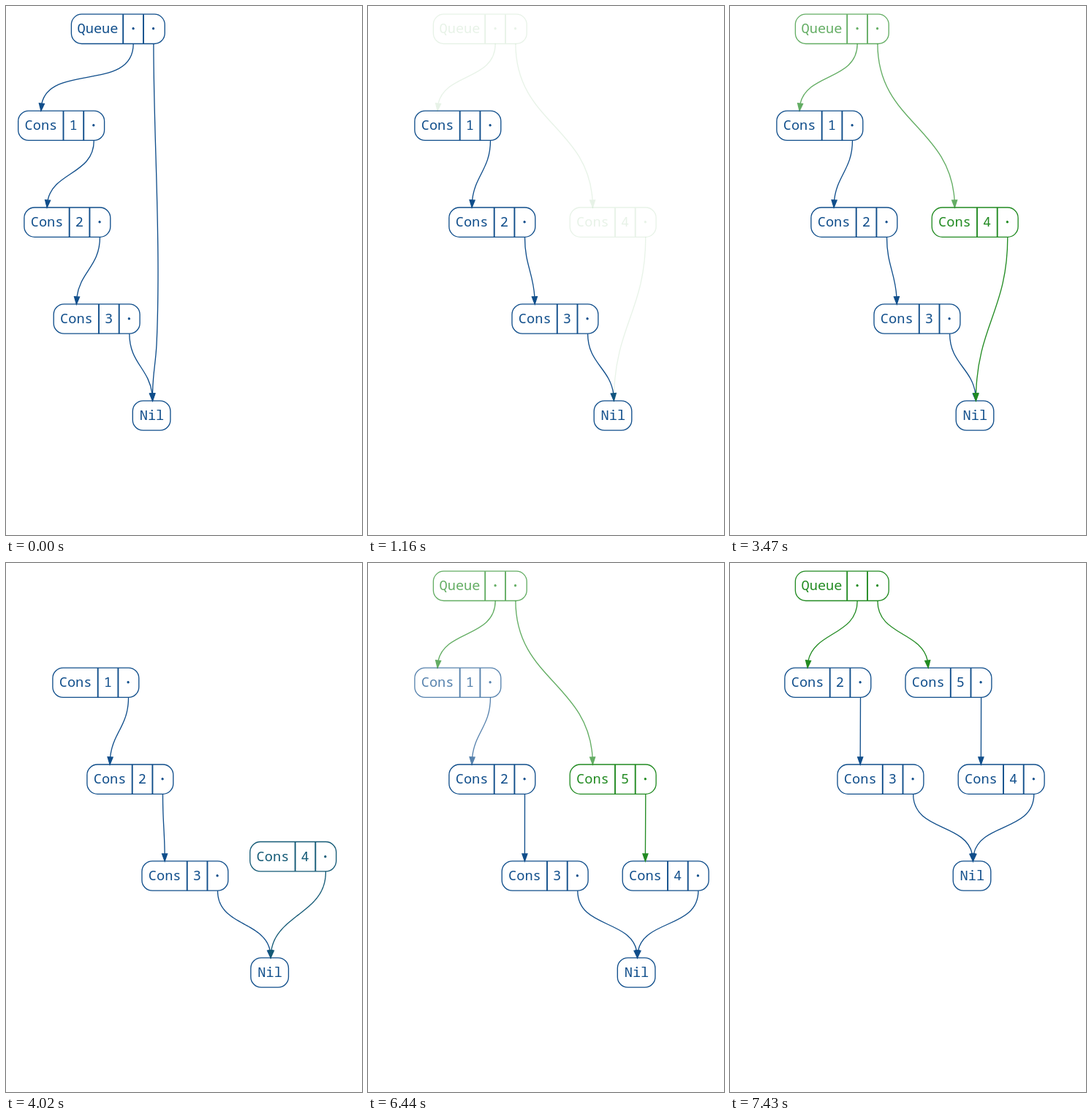
Recreate the animation shown at these times as an HTML page. Size 487 by 722 pixels, loop 8 s.

```html
<!DOCTYPE html>
<html lang="en">
<head>
<meta charset="utf-8">
<title>Persistent queue</title>
<style>
  html, body { margin: 0; width: 100%; height: 100%; overflow: hidden; background: #fff; }
  svg { display: block; }
  text { font: 18.67px "Noto Sans Mono", monospace; text-anchor: middle; stroke: none; }
  .dot { stroke: inherit; stroke-width: 0.9; }
  .bar { stroke-width: 1.9; }
</style>
</head>
<body>
<svg id="stage" width="487" height="722" viewBox="0 0 487 722" fill="none" stroke-width="1.33"></svg>
<script>
const LOOP = 8000, STEP = 110, STEPS = 10, SAMPLES = 48;
const STARTS = [500, 3470, 6440];
const ROW_TOP = 11.2, ROW_GAP = 131.9, HEIGHT = 40.3, RADIUS = 14.2, HEAD = 10;
const BLUE = [16, 78, 139], GREEN = [34, 139, 34];

// Geometry per node kind, relative to the node's left edge.
const KINDS = {
  Queue: { width: 127.8, bars: [70.8, 98.6], labels: [36.1, 84.6, 112.2], ports: [84.8, 112.5], entry: 0 },
  Cons: { width: 117.9, bars: [61.8, 89.5], labels: [31.2, 75.4, 103.1], ports: [103.6], entry: 31.2 },
  Nil: { width: 51.6, bars: [], labels: [26.2], ports: [], entry: 27.2 }
};

// nodes: name -> [left, row]; edges: [from, to, port, optional curve up to the arrowhead]
const STATES = [
  {
    nodes: { Queue: [89.4, 0], 1: [16.7, 1], 2: [24.9, 2], 3: [65.2, 3], Nil: [173.3, 4] },
    green: [],
    edges: [['Queue', 1, 0], [1, 2, 0], [2, 3, 0], [3, 'Nil', 0],
      ['Queue', 'Nil', 1, 'C202,160 208,250 208,361 C208,400 207.5,430 206,462 C204.5,490 201,500']]
  },
  {
    nodes: { Queue: [89.4, 0], 1: [63.9, 1], 2: [110.9, 2], 4: [276.2, 2], 3: [197, 3], Nil: [309.2, 4] },
    green: ['Queue', '4'],
    edges: [['Queue', 1, 0], ['Queue', 4, 1], [1, 2, 0], [2, 3, 0], [3, 'Nil', 0], [4, 'Nil', 0]]
  },
  {
    nodes: { Queue: [89.4, 0], 1: [63.9, 1], 2: [110.9, 2], 5: [276.2, 2], 3: [183.2, 3], 4: [348.2, 3], Nil: [341.3, 4] },
    green: ['Queue', '5'],
    edges: [['Queue', 1, 0], ['Queue', 5, 1], [1, 2, 0], [2, 3, 0], [5, 4, 0], [3, 'Nil', 0], [4, 'Nil', 0]]
  },
  {
    nodes: { Queue: [89.4, 0], 2: [74.9, 1], 5: [240, 1], 3: [147, 2], 4: [312.2, 2], Nil: [305.2, 3] },
    green: ['Queue'],
    edges: [['Queue', 2, 0], ['Queue', 5, 1], [2, 3, 0], [5, 4, 0], [3, 'Nil', 0], [4, 'Nil', 0]]
  }
];

const stage = document.getElementById('stage');
const clamp = v => Math.min(1, Math.max(0, v));
const mix = (a, b, k) => a + (b - a) * k;
const mixAll = (a, b, k) => a.map((v, i) => mix(v, b[i], k));
const kindOf = name => KINDS[name] || KINDS.Cons;
const rowTop = row => ROW_TOP + row * ROW_GAP;

// The part of a cubic from its start up to t, by repeated halving of its polygon.
function cutCubic(points, t) {
  const kept = [points[0]];
  while (points.length > 1) {
    points = points.slice(1).map((p, i) => mixAll(points[i], p, t));
    kept.push(points[0]);
  }
  return kept;
}

// A cubic with vertical ends, trimmed to leave room for the arrowhead.
function link([x1, y1], [x2, y2]) {
  const reach = Math.hypot(x2 - x1, y2 - y1) * 4 / 9;
  const cubic = [[x1, y1], [x1, y1 + reach], [x2, y2 - reach], [x2, y2]];
  let low = 0, high = 1;
  for (let i = 0; i < 24; i++) {
    const t = (low + high) / 2, end = cutCubic(cubic, t)[3];
    if (Math.hypot(x2 - end[0], y2 - end[1]) > HEAD) low = t; else high = t;
  }
  const [start, c1, c2, base] = cutCubic(cubic, low);
  return { d: `M${start}C${c1} ${c2} ${base}`, base };
}

function samplePath(d) {
  const path = document.createElementNS('http://www.w3.org/2000/svg', 'path');
  path.setAttribute('d', d);
  const length = path.getTotalLength();
  return Array.from({ length: SAMPLES + 1 }, (_, i) => {
    const p = path.getPointAtLength(length * i / SAMPLES);
    return [p.x, p.y];
  });
}

function buildState({ nodes, green, edges }, index) {
  const items = new Map();
  const color = name => green.includes(String(name)) ? GREEN : BLUE;
  // Each state owns a fresh queue cell, so it never carries over.
  const key = name => name === 'Queue' ? name + index : name;
  for (const [name, [x, row]] of Object.entries(nodes)) {
    items.set(key(name), { name, pos: [x, rowTop(row)], color: color(name) });
  }
  for (const [from, to, port, curve] of edges) {
    const [fx, fRow] = nodes[from], [tx, tRow] = nodes[to];
    const start = [fx + kindOf(from).ports[port], rowTop(fRow) + HEIGHT];
    const tip = [tx + kindOf(to).entry, rowTop(tRow)];
    const above = [tip[0], tip[1] - HEAD];
    const { d, base } = curve ? { d: `M${start}${curve} ${above}`, base: above } : link(start, tip);
    items.set(`${key(from)}>${to}`, { d, points: samplePath(d), tip, base, color: color(from) });
  }
  return items;
}

function nodeMarkup({ name, pos: [x, y] }, fill) {
  const kind = kindOf(name);
  const words = name === 'Queue' ? [name, '·', '·'] : name === 'Nil' ? [name] : ['Cons', name, '·'];
  const label = (word, i) => `<text class="${word === '·' ? 'dot' : ''}" x="${x + kind.labels[i]}" ` +
    `y="${y + HEIGHT / 2 + 6}" fill="${fill}">${word}</text>`;
  return `<rect x="${x}" y="${y}" width="${kind.width}" height="${HEIGHT}" rx="${RADIUS}"/>` +
    kind.bars.map(b => `<path class="bar" d="M${x + b},${y}v${HEIGHT}"/>`).join('') +
    words.map(label).join('');
}

function edgeMarkup({ d, tip, base }, fill) {
  const ux = (tip[0] - base[0]) / HEAD, uy = (tip[1] - base[1]) / HEAD;
  const corner = s => [base[0] - uy * 3.5 * s, base[1] + ux * 3.5 * s];
  return `<path d="${d}"/><polygon points="${corner(1)} ${tip} ${corner(-1)}" fill="${fill}"/>`;
}

function itemMarkup(item, opacity) {
  if (opacity <= 0) return '';
  const paint = `rgb(${item.color.map(Math.round)})`;
  const draw = item.name ? nodeMarkup : edgeMarkup;
  return `<g stroke="${paint}" opacity="${opacity}">${draw(item, paint)}</g>`;
}

function blend(a, b, k) {
  if (k === 0) return a;
  if (k === 1) return b;
  const color = mixAll(a.color, b.color, k);
  if (a.name) return { name: a.name, pos: mixAll(a.pos, b.pos, k), color };
  const points = a.points.map((p, i) => mixAll(p, b.points[i], k));
  return { d: 'M' + points.join('L'), tip: mixAll(a.tip, b.tip, k), base: mixAll(a.base, b.base, k), color };
}

const built = STATES.map(buildState);

// Thirds of a transition: leavers fade out, the rest move, newcomers fade in.
function render(index, progress) {
  const before = built[index], after = built[index + 1];
  const fadeOut = clamp(1 - progress * 3), move = clamp(progress * 3 - 1), fadeIn = clamp(progress * 3 - 2);
  let markup = '';
  for (const [key, item] of before) {
    if (!after.has(key)) markup += itemMarkup(item, fadeOut);
  }
  for (const [key, item] of after) {
    markup += before.has(key) ? itemMarkup(blend(before.get(key), item, move), 1) : itemMarkup(item, fadeIn);
  }
  stage.innerHTML = markup;
}

let shown = '';
function tick() {
  const t = performance.now() % LOOP;
  const index = Math.max(0, STARTS.filter(s => t >= s).length - 1);
  const step = Math.min(STEPS, Math.max(0, Math.floor((t - STARTS[index]) / STEP) + 1));
  const id = index + ':' + step;
  if (id !== shown) {
    shown = id;
    render(index, step / STEPS);
  }
  requestAnimationFrame(tick);
}
tick();
</script>
</body>
</html>
```
